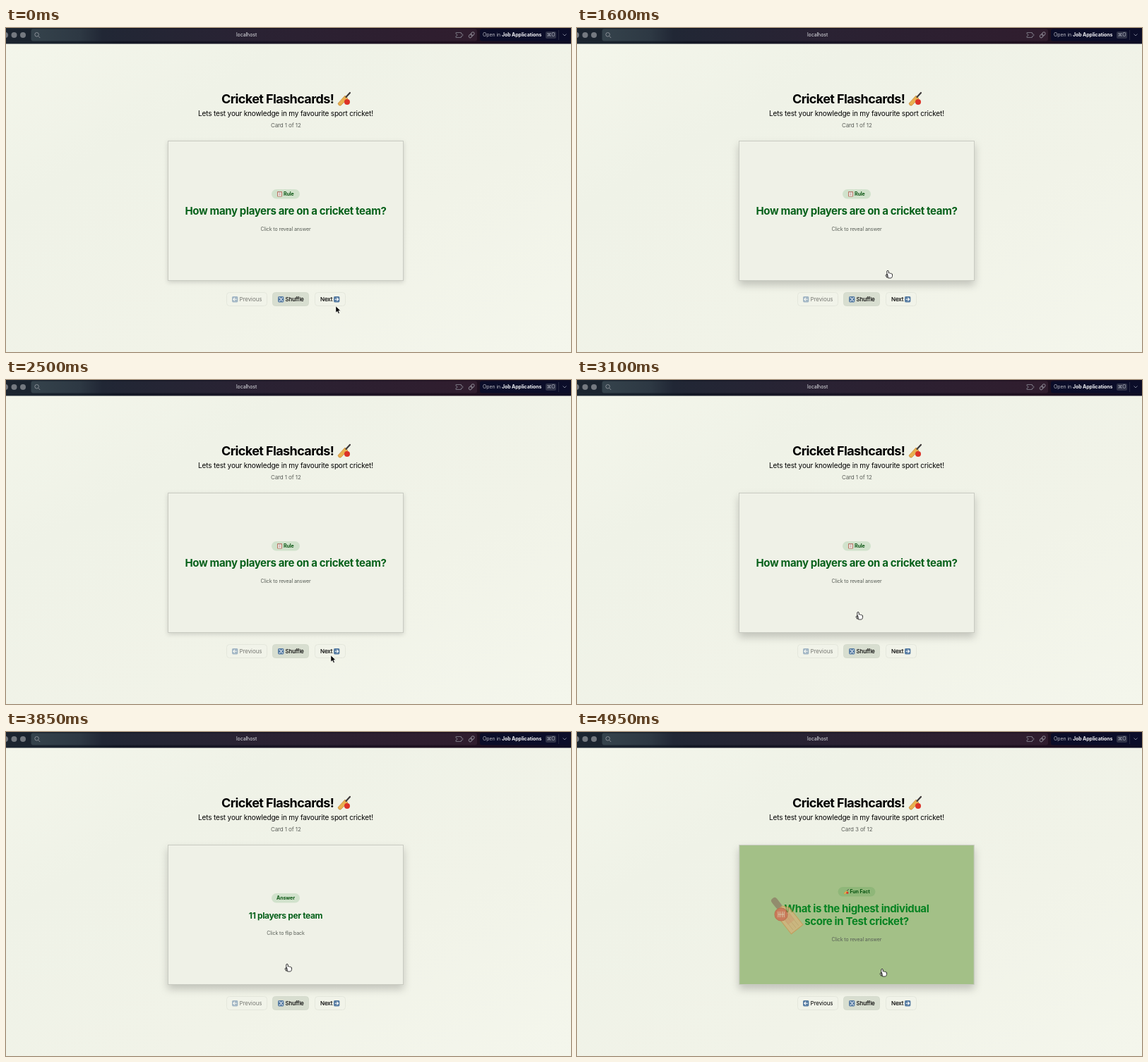
These frames come from a looping animation (800x460 px, 5000 ms). An HTML page:

```html
<!DOCTYPE html>
<html lang="en">
<head>
<meta charset="utf-8">
<title>Flashcards</title>
<style>
html, body { margin: 0; width: 100%; height: 100%; overflow: hidden; background: #f1f3e8 }
svg { display: block; font-family: Inter, "Open Sans", sans-serif }
.mid { text-anchor: middle }
.b { font-weight: 700 }
.title { font-size: 18px; letter-spacing: -.6px }
.sub { font-size: 10px; letter-spacing: -.16px }
.small { font-size: 8px; letter-spacing: -.1px }
.tiny { font-size: 7px; letter-spacing: -.08px }
.question { font-size: 15px; letter-spacing: -.36px }
</style>
</head>
<body>
<svg width="800" height="460" viewBox="0 0 800 460">
<defs>
  <linearGradient id="page" x1="0" y1="0" x2="1" y2="1">
    <stop stop-color="#f4f6eb"/><stop offset=".28" stop-color="#eff2e7"/>
    <stop offset=".65" stop-color="#f1f3e8"/><stop offset="1" stop-color="#f4f6ec"/>
  </linearGradient>
  <linearGradient id="bar">
    <stop stop-color="#1c2530"/><stop offset=".13" stop-color="#18212c"/><stop offset=".2" stop-color="#131724"/>
    <stop offset=".55" stop-color="#1b1424"/><stop offset=".82" stop-color="#20101f"/><stop offset="1" stop-color="#0d0d24"/>
  </linearGradient>
  <linearGradient id="address">
    <stop stop-color="#35434c"/><stop offset=".11" stop-color="#2d3843"/><stop offset=".16" stop-color="#212735"/>
    <stop offset=".5" stop-color="#2a2233"/><stop offset="1" stop-color="#301d2e"/>
  </linearGradient>
  <g id="racket">
    <path d="M1 16 11 5 15 9 5 19Q2 20 1 16Z" fill="#e9b04f" stroke="#b97b2b" stroke-width=".6"/>
    <path d="M12.5 7 18 1" stroke="#3f3b3c" stroke-width="2.2" stroke-linecap="round"/>
    <circle cx="14" cy="14" r="4" fill="#dc3227"/>
  </g>
  <g id="board">
    <rect width="7" height="7.5" rx="1" fill="#b5705e"/><rect x="1" y="1.2" width="5" height="5.5" fill="#f4eeea"/>
    <path d="M2 .8H5M2 3H5M2 4.8H5" stroke="#a48a88" stroke-width=".7"/>
  </g>
  <g id="tile"><rect width="8.4" height="8.4" rx="1.6" fill="#587da3"/></g>
  <g id="right"><use href="#tile"/><path d="M1.6 4.2H6.5M4.4 2 6.6 4.2 4.4 6.4" fill="none" stroke="#fff" stroke-width="1.1"/></g>
</defs>

<rect width="800" height="460" fill="url(#page)"/>
<rect width="800" height="22.5" fill="url(#bar)"/>
<g fill="#747980"><circle cx="-1" cy="10" r="4"/><circle cx="11.5" cy="10" r="4"/><circle cx="24" cy="10" r="4"/></g>
<rect x="35.500" y="1.500" width="631.500" height="17" rx="3" fill="url(#address)"/>
<g fill="none" stroke="#8b9097">
  <circle cx="43.600" cy="9.300" r="2.800"/><path d="M45.700 11.500 48.200 14"/>
  <path d="M637 6.500H644.500V8.500Q647 8 647 10Q647 12 644.500 11.500V13.500H637V11.500Q639 11.500 639 10Q639 8.500 637 8.500Z" stroke="#74707c"/>
  <g transform="rotate(-45 659 10)" stroke="#85808c"><rect x="654.500" y="8" width="5.500" height="4" rx="2"/><rect x="658.500" y="8" width="5.500" height="4" rx="2"/></g>
</g>
<text class="mid tiny" x="340.500" y="12.400" fill="#e2e3e7">localhost</text>
<rect x="671" y="1.500" width="127" height="17" rx="3" fill="#0b0d29"/>
<path d="M782.500 3V17" stroke="#25273e"/>
<text class="tiny" x="675" y="12.300" fill="#b4b5bf">Open in <tspan class="b" fill="#f1f1f4">Job Applications</tspan></text>
<rect x="764" y="5" width="15" height="10" rx="2" fill="#303348"/>
<text class="mid tiny" x="771.500" y="12.400" fill="#aaaebb">⌘O</text>
<path d="M788.500 8.500 791 11 793.500 8.500" fill="none" stroke="#777b90"/>

<text class="title b" x="305" y="107">Cricket Flashcards!</text>
<use href="#racket" x="469" y="91"/>
<text class="mid sub" x="396" y="125">Lets test your knowledge in my favourite sport cricket!</text>
<text id="count" class="mid small" x="396.300" y="141" fill="#5d605b"></text>

<g id="card">
  <rect id="face" x="-166.500" y="-99" width="333" height="198" stroke="#c9cbc2"/>
  <rect id="pill" height="13.500" rx="6.750" fill="#0a7d1e" fill-opacity=".13"/>
  <use id="icon"/>
  <text id="tag" class="tiny b" fill="#0a5512"></text>
  <text id="line1" class="mid question b"></text>
  <text id="line2" class="mid question b"></text>
  <text id="hint" class="mid tiny" fill="#565c55"></text>
</g>
<g id="hit">
  <g id="bat">
    <rect x="-4.500" y="-29" width="9" height="18" rx="4" fill="#8a7461"/>
    <path d="M-4-12H4L10.500-4V27H-10.500V-4Z" fill="#dfb27c" stroke="#d58a45"/>
    <path d="M-5-3V24M0-6V24M5-3V24" stroke="#c99660" stroke-width=".8"/>
    <rect x="-6" y="2" width="12" height="12" fill="#e0916a" fill-opacity=".7"/>
  </g>
  <g id="ball">
    <circle r="8.700" fill="#de5845" stroke="#c94a35"/>
    <path d="M-4-4V4M4-4V4M-1.500-4V4M1.500-4V4M-4 0H4" stroke="#f5cfbd" stroke-width=".9"/>
  </g>
</g>

<g stroke="#e4e7dc" fill="#f1f3e9">
  <rect x="312.500" y="375.500" width="57" height="19" rx="4"/>
  <rect x="377.500" y="375.500" width="51" height="19" rx="4" fill="#d8ded0" stroke="#d5dbcd"/>
  <rect x="437.500" y="375.500" width="43" height="19" rx="4"/>
</g>
<g class="small">
  <g id="prev"><use href="#right" transform="translate(328.400 381)scale(-1 1)"/><text x="330.500" y="388">Previous</text></g>
  <use href="#tile" x="385" y="381"/>
  <path d="M386.500 383H388L391 387.500H392.200M386.500 387.500H388L391 383H392.200" fill="none" stroke="#fff" stroke-width=".9"/>
  <text x="395.500" y="388" stroke="#000" stroke-width=".15">Shuffle</text>
  <text x="445" y="388" stroke="#000" stroke-width=".15">Next</text><use href="#right" x="464" y="381"/>
</g>

<path id="arrow" d="M0 0V9L2.200 7.200 3.700 10.500 5.300 9.800 3.800 6.600H6.700Z" stroke="#fff" stroke-width=".5"/>
<path id="hand" d="M-1.200 6V1Q0-.5 1.200 1V4Q2.500 3.200 3.400 4.400Q4.600 3.700 5.200 5Q6.500 4.600 6.500 6V8.500Q6 10.800 4.500 11H.5Q-1-.2 -1 10.500L-3 7.500Q-3 5.600-1.200 6.800Z" fill="#fff" stroke="#222" stroke-width=".9"/>
</svg>
<script>
const $ = id => document.getElementById(id);
const set = (id, attrs) => { for (const k in attrs) $(id).setAttribute(k, attrs[k]); };
const clamp = v => Math.max(0, Math.min(1, v));

const LOOP = 5000, FLIP = 600;
const clicks = [3259, 4930];
const rule = { tag: "Rule", icon: "#board", width: 40, fill: "#eff1e7", ink: "#07611b" };
const cards = [
  { ...rule, from: 0, lines: ["How many players are on a cricket team?"] },
  { ...rule, from: 4250, lines: ["What is an 'over' in cricket?"] },
  { tag: "Fun Fact", icon: "#racket", width: 53, fill: "#a3c087", ink: "#078322", from: 4600,
    lines: ["What is the highest individual", "score in Test cricket?"] }
];
const path = [ // time, x, y
  [50, 467, 395], [200, 464, 387], [1150, 464, 387], [1500, 440, 344], [2150, 440, 344],
  [2400, 460, 391], [2780, 460, 391], [3050, 398, 329], [3880, 398, 329],
  [4200, 451, 391], [4550, 451, 391], [4850, 432, 336], [LOOP, 432, 336]
];

// cubic-bezier(.25, .1, .25, 1)
function ease(x) {
  let lo = 0, hi = 1, s;
  for (let i = 0; i < 20; i++) {
    s = (lo + hi) / 2;
    if (.75 * s * (1 - s) + s ** 3 < x) lo = s; else hi = s;
  }
  return .3 * s * (1 - s) ** 2 + 3 * s * s * (1 - s) + s ** 3;
}

function pointer(t) {
  const i = path.findIndex(p => p[0] > t);
  if (i < 1) return path[0].slice(1);
  const [a, b] = [path[i - 1], path[i]];
  let k = (t - a[0]) / (b[0] - a[0]);
  k = k * k * (3 - 2 * k);
  return [1, 2].map(j => a[j] + (b[j] - a[j]) * k);
}

function drawCard(card, turn, hover) {
  const c = Math.cos(turn * Math.PI), back = c < 0, two = card.lines.length > 1 && !back;
  const dy = two ? -9 : 0, w = back ? 40 : card.width;
  set("card", { transform: `translate(396 259.5) scale(${Math.max(.001, Math.abs(c))} 1)` });
  set("face", { fill: card.fill });
  $("face").style.filter = `drop-shadow(0 ${2 + 4 * hover}px ${3 + 3 * hover}px rgba(0,0,0,${.15 + .05 * hover}))`;
  set("pill", { x: -w / 2, y: -30.5 + dy, width: w });
  const bat = card.icon === "#racket";
  set("icon", { href: card.icon, visibility: back ? "hidden" : "visible",
    transform: `translate(${8 - w / 2} ${-27.5 + dy}) scale(${bat ? .38 : 1})` });
  set("tag", { x: back ? 0 : 17 - w / 2, y: -21.2 + dy, "text-anchor": back ? "middle" : "start" });
  $("tag").textContent = back ? "Answer" : card.tag;
  set("line1", { y: 5.2 + dy, fill: card.ink });
  set("line2", { y: 14.2, fill: card.ink });
  $("line1").style.fontSize = back ? "12px" : "";
  $("line1").textContent = back ? "11 players per team" : card.lines[0];
  $("line2").textContent = two ? card.lines[1] : "";
  set("hint", { y: two ? 37.5 : 28.5 });
  $("hint").textContent = back ? "Click to flip back" : "Click to reveal answer";
}

function drawHit(age) {
  const on = age >= 0 && age < FLIP, e = on ? ease(age / FLIP) : 0;
  set("hit", { opacity: on ? Math.min(.65 + .4 * e, 3 * (1 - e)) : 0 });
  set("bat", { transform: `translate(${293.7 + 66 * e} 259) rotate(${-40 + 91 * e})` });
  set("ball", { transform: `translate(${287 + 107 * e} ${260 - 56 * e}) scale(${1.05 - .38 * e})` });
}

function draw(t) {
  const n = cards.findLastIndex(c => t >= c.from);
  const click = clicks.findLast(c => t >= c) ?? LOOP;
  const age = t - click, flipped = age >= 0 && click >= cards[n].from;
  const [x, y] = pointer(t);
  $("count").textContent = `Card ${n + 1} of 12`;
  drawCard(cards[n], flipped ? ease(clamp(age / FLIP)) : 0, clamp((362 - y) / 14));
  drawHit(flipped ? age : -1);
  set("prev", { opacity: n ? 1 : .5 });
  const over = y < 359, at = `translate(${x} ${y})`;
  set("arrow", { transform: at, visibility: over ? "hidden" : "visible" });
  set("hand", { transform: at, visibility: over ? "visible" : "hidden" });
}

const start = performance.now();
function tick() {
  draw(Math.floor((performance.now() - start) % LOOP / 50) * 50);
  requestAnimationFrame(tick);
}
tick();
</script>
</body>
</html>
```
